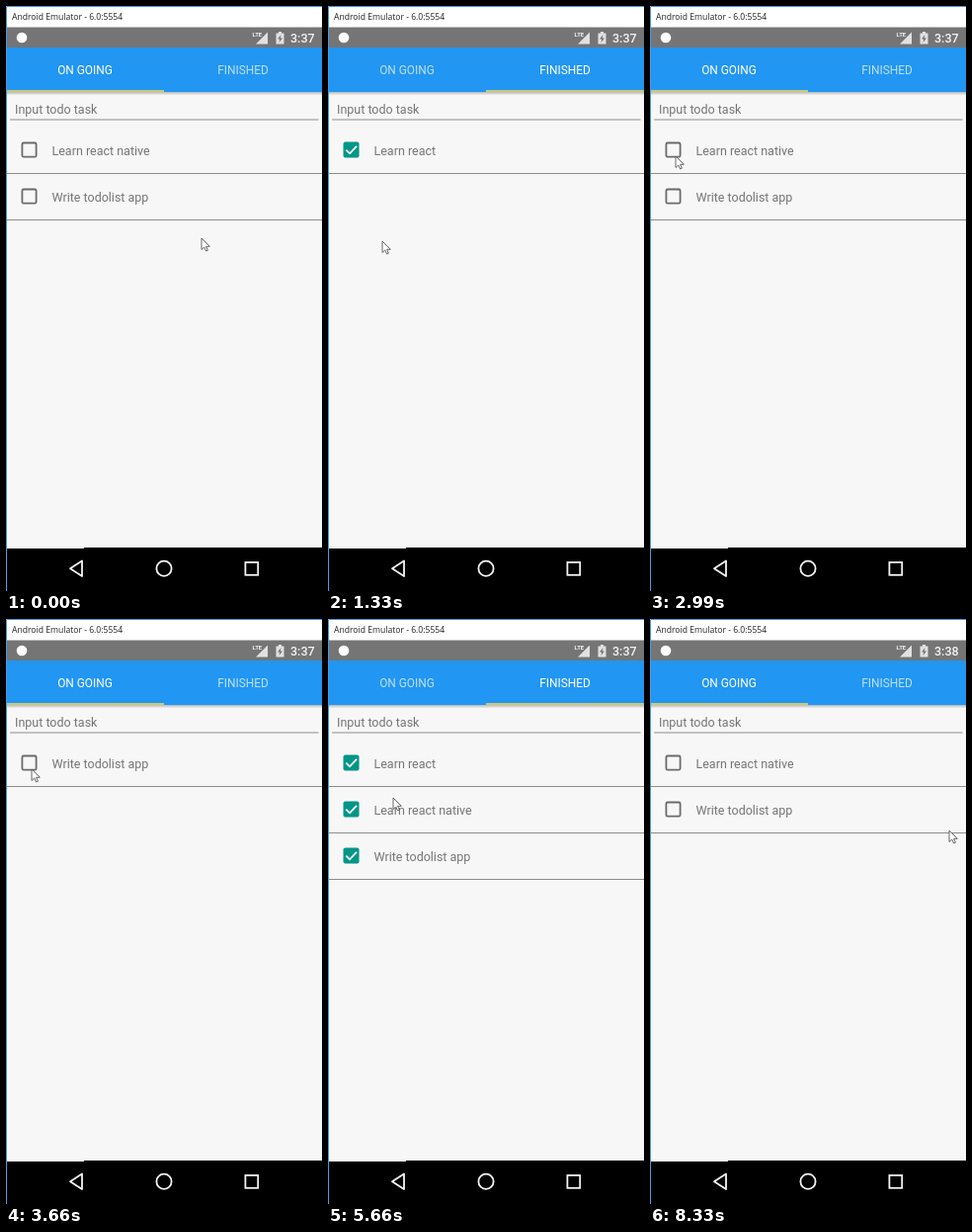
An HTML page for the animation above (8990 ms loop, 320x592 px).

```html
<!DOCTYPE html>
<html lang="en">
<head>
<meta charset="utf-8">
<title>Todo list</title>
<style>
  html, body { margin: 0; width: 100%; height: 100%; overflow: hidden; background: #fff; }
  svg { display: block; width: 320px; height: 592px; font: 12.5px Roboto, sans-serif; }
  .tab { font-size: 11.9px; fill: #fff; text-anchor: middle; }
  .page text { fill: #757575; }
  .line { stroke: #8c8c8c; }
  .nav { fill: none; stroke: #f4f4f4; stroke-width: 1.8; }
</style>
</head>
<body>
<svg viewBox="0 0 320 592">
  <defs>
    <linearGradient id="shade" x2="0" y2="1">
      <stop stop-color="#000" stop-opacity=".25"/>
      <stop offset="1" stop-color="#000" stop-opacity="0"/>
    </linearGradient>
  </defs>
  <rect width="320" height="592" fill="#f7f7f7"/>
  <g class="page"></g>
  <g class="page"></g>

  <rect width="320" height="22" fill="#fff"/>
  <text x="6" y="14" fill="#222" style="font: 8.6px 'Open Sans', sans-serif">Android Emulator - 6.0:5554</text>
  <rect y="21.5" width="320" height="20.5" fill="#757575"/>
  <circle cx="16" cy="32" r="5.3" fill="#fff"/>
  <g fill="#f4f4f4">
    <text x="249.5" y="31" font-size="6" font-weight="700">LTE</text>
    <path d="M253 38.5H265V26.5Z" opacity=".85"/>
    <path d="M273.5 27.5H276V26H279V27.5H281.5V38.5H273.5Z" opacity=".85"/>
    <path d="M278.5 29L275 33.6H277.2L276.5 37L280 32.4H277.8Z" fill="#757575"/>
    <text id="clock" x="288" y="37" font-weight="500"></text>
  </g>
  <rect y="42" width="320" height="45" fill="#2196f3"/>
  <rect y="87" width="320" height="3.5" fill="url(#shade)"/>
  <text class="tab" x="80" y="69.3">ON GOING</text>
  <text class="tab" x="240" y="69.3">FINISHED</text>
  <rect id="marker" y="85" width="160" height="2.2" fill="#c9ca7e"/>

  <path d="M0 549H79V548H320V592H0Z"/>
  <path class="nav" d="M77 561.5V577L65 569.2Z" stroke-linejoin="round"/>
  <circle class="nav" cx="160" cy="569.3" r="7.6"/>
  <rect class="nav" x="242.4" y="563" width="12.8" height="12.8"/>
  <path d="M.5 592V.5H320" fill="none" stroke="#4a9be6"/>

  <g id="press" fill="#5cc3f0">
    <circle r="22" opacity=".13"/>
    <circle r="11" opacity=".08"/>
    <circle r="4.2"/>
  </g>
  <g id="click" fill="none" stroke="#8fd6f2">
    <circle r="14" stroke-width="5" fill="#d9f0fa"/>
    <circle r="7.5" stroke-width="2"/>
    <circle r="2" stroke-width="2.5"/>
  </g>
  <path id="cursor" d="M0 0V11.5L2.7 9L4.6 13L6.4 12.2L4.6 8.3H8.3Z" fill="#fff" stroke="#555" stroke-width=".9"/>
</svg>
<script>
const LOOP = 8990, STEP = 1000 / 3, LAST = 25;

// the pointer travels straight between these points: step, x, y
const PATH = [
  [0, 198, 235], [4, 55, 238], [5, 103, 229], [6, 240, 205], [9, 26, 152], [13, 26, 152],
  [14, 190, 205], [17, 66, 181], [18, 28, 193], [20, 28, 193], [21, 67, 213], [25, 303, 214],
];
const SWIPES = [1, 5, 14, 22];
const SWIPE_STEPS = 2;

// each task counts as finished between two steps
const TASKS = [
  { name: 'Learn react', from: 0, to: Infinity },
  { name: 'Learn react native', from: 10, to: 19 },
  { name: 'Write todolist app', from: 13, to: 21 },
];

const $ = id => document.getElementById(id);
const pages = document.querySelectorAll('.page');
const tabs = document.querySelectorAll('.tab');
const move = (el, x, y) => el.setAttribute('transform', `translate(${x} ${y})`);
const clamp = v => Math.min(1, Math.max(0, v));
const easeOut = u => 1 - (1 - u) ** 2.5;

function pointer(step) {
  const i = Math.max(1, PATH.findIndex(point => point[0] >= step));
  const [s0, x0, y0] = PATH[i - 1], [s1, x1, y1] = PATH[i];
  const u = (step - s0) / (s1 - s0);
  return [x0 + (x1 - x0) * u, y0 + (y1 - y0) * u];
}

// 0 = on going, 1 = finished; swipes alternate in direction
function pagePosition(step) {
  return SWIPES.reduce((sum, start, i) =>
    sum + (-1) ** i * easeOut(clamp((step - start) / SWIPE_STEPS)), 0);
}

function row(name, i, done) {
  const box = done
    ? '<rect x="15.5" y="137.6" width="16" height="16" rx="2" fill="#009688"/>' +
      '<path d="M18.3 145.6L22 149.3L29 141.9" fill="none" stroke="#fff" stroke-width="1.8"/>'
    : '<rect x="16.4" y="138.5" width="14.2" height="14.2" rx="1.5" fill="none" stroke="#6b6b6b" stroke-width="1.8"/>';
  return `<g transform="translate(0 ${47 * i})">${box}<text x="46.5" y="150.5">${name}</text>` +
    '<path class="line" d="M0 169.5H320"/></g>';
}

function pageContent(step, done) {
  const shown = TASKS.filter(t => (step >= t.from && step < t.to) === done);
  return '<text x="9" y="109">Input todo task</text><path class="line" d="M4 115H316.5"/>' +
    shown.map((t, i) => row(t.name, i, done)).join('');
}

// a touch mark stays where the pointer was one step earlier
function touch(el, visible, step) {
  el.style.display = visible ? '' : 'none';
  if (visible) move(el, ...pointer(step - 1));
}

function draw(step) {
  const position = pagePosition(step);
  pages.forEach((page, i) => {
    page.innerHTML = pageContent(step, i === 1);
    move(page, 320 * (i - position), 0);
    tabs[i].style.opacity = Math.abs(position - i) === 1 ? .7 : 1;
  });
  $('marker').setAttribute('x', Math.min(160, 220 * position));
  $('clock').textContent = step < 23 ? '3:37' : '3:38';
  touch($('press'), SWIPES.includes(step - 1), step);
  touch($('click'), TASKS.some(t => step && (t.from === step || t.to === step)), step);
  move($('cursor'), ...pointer(step));
}

let shown = -1;
function tick() {
  // the small lead absorbs rounding in the step times
  const step = Math.min(LAST, Math.floor((performance.now() % LOOP + 11) / STEP));
  if (step !== shown) draw(shown = step);
  requestAnimationFrame(tick);
}
tick();
</script>
</body>
</html>
```
